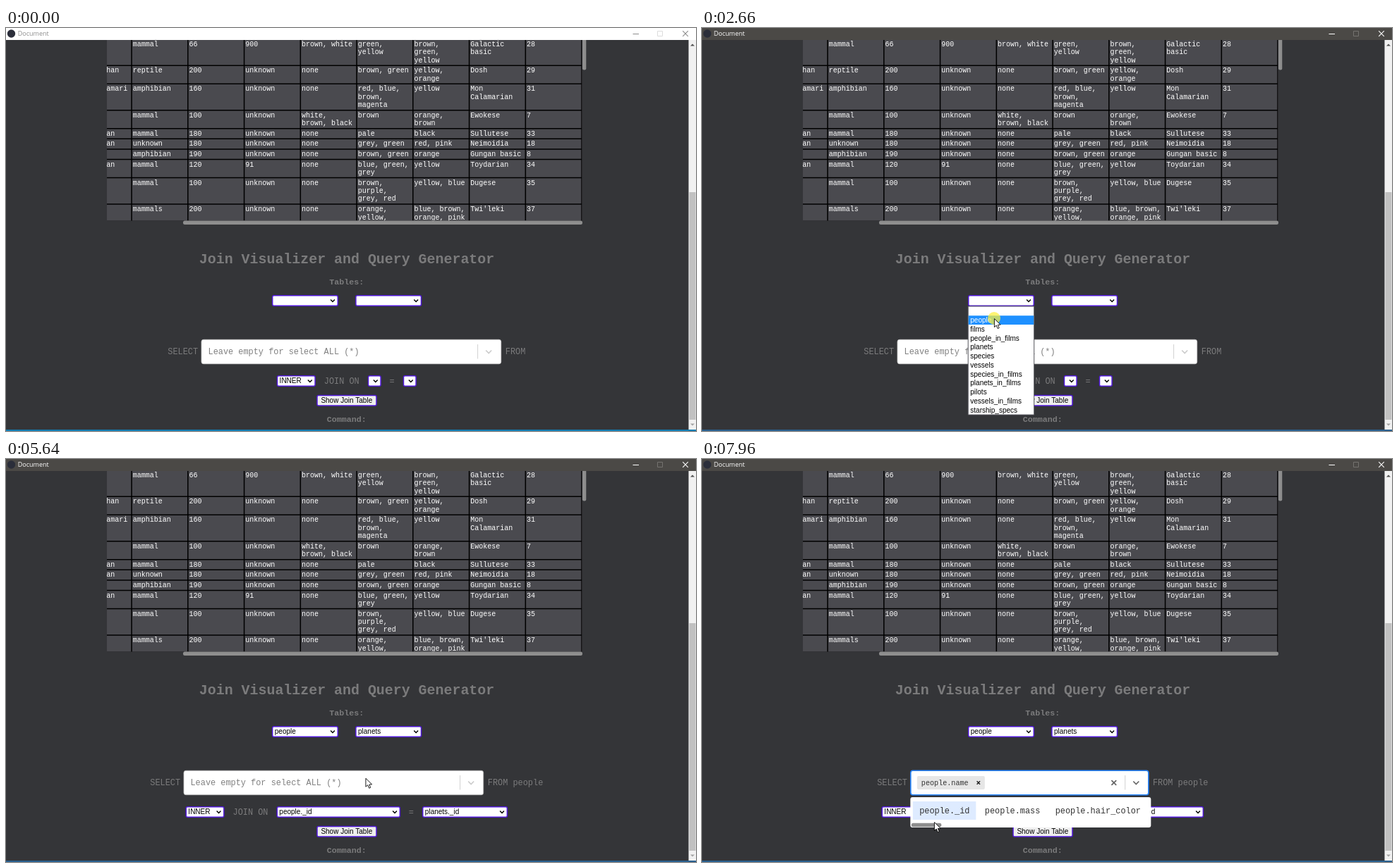
Recreate the animation shown at these times as an HTML page with a canvas. Size 978x572 px, loop 8 s.

```html
<!DOCTYPE html>
<html>
<head>
<meta charset="utf-8">
<title>Document</title>
<style>
html, body { margin: 0; width: 100%; height: 100%; overflow: hidden; background: #343538; }
canvas { display: block; }
</style>
</head>
<body>
<canvas id="stage" width="978" height="572"></canvas>
<script>
const ctx = document.getElementById('stage').getContext('2d');
const LOOP = 8000, MONO = '"Liberation Mono", monospace', SANS = '"Liberation Sans", sans-serif';
const PURPLE = '#5019d8', GREY = '#7b7b7c', BACK = '#343538';
const CHAR = 7.15, CENTER = 482.8;

const TABLES = ['', 'people', 'films', 'people_in_films', 'planets', 'species', 'vessels',
  'species_in_films', 'planets_in_films', 'pilots', 'vessels_in_films', 'starship_specs'];

// Cells are split by "|", lines within a cell by "/".
const ROWS = [
  '|mammal|66|900|brown, white|green,/yellow|brown,/green,/yellow|Galactic/basic|28',
  'han|reptile|200|unknown|none|brown, green|yellow,/orange|Dosh|29',
  'amari|amphibian|160|unknown|none|red, blue,/brown,/magenta|yellow|Mon/Calamarian|31',
  '|mammal|100|unknown|white,/brown, black|brown|orange,/brown|Ewokese|7',
  'an|mammal|180|unknown|none|pale|black|Sullutese|33',
  'an|unknown|180|unknown|none|grey, green|red, pink|Neimoidia|18',
  '|amphibian|190|unknown|none|brown, green|orange|Gungan basic|8',
  'an|mammal|120|91|none|blue, green,/grey|yellow|Toydarian|34',
  '|mammal|100|unknown|none|brown,/purple,/grey, red|yellow, blue|Dugese|35',
  '|mammals|200|unknown|none|orange,/yellow,|blue, brown,/orange, pink|Twi\'leki|37',
].map(row => row.split('|').map(cell => cell.split('/')));

// Pointer path: time, x, y
const PATH = [[120, 901, 551], [740, 421, 395], [880, 421, 395], [1000, 419, 389], [1960, 419, 389],
  [2340, 413, 411], [2490, 413, 411], [2500, 414, 412], [2760, 414, 412], [3420, 550, 391], [3690, 550, 390],
  [4500, 550, 390], [5050, 540, 451], [5350, 540, 451], [6010, 466, 455], [6200, 466, 454],
  [6490, 466, 454], [6880, 322, 478], [7290, 380, 498], [7810, 380, 498], [7950, 329, 515]];
const CLICKS = [[1000, 1130], [2655, 2760], [3690, 3780], [5250, 5350], [6200, 6245], [7350, 7460]];

function pointerAt(t) {
  if (t < PATH[0][0]) return null;
  const next = PATH.findIndex(p => p[0] > t);
  if (next < 0) return PATH[PATH.length - 1].slice(1);
  const [t0, x0, y0] = PATH[next - 1], [t1, x1, y1] = PATH[next];
  const u = (t - t0) / (t1 - t0), k = u * u * (3 - 2 * u);
  return [x0 + (x1 - x0) * k, y0 + (y1 - y0) * k];
}

function rect(x, y, w, h, fill, radius = 0, stroke, width = 1.5) {
  ctx.beginPath();
  ctx.roundRect(x, y, w, h, radius);
  if (fill) { ctx.fillStyle = fill; ctx.fill(); }
  if (stroke) { ctx.strokeStyle = stroke; ctx.lineWidth = width; ctx.stroke(); }
}

function text(str, x, y, color, size, family = MONO, weight = '', align = 'left') {
  ctx.font = `${weight} ${size}px ${family}`;
  ctx.textAlign = align;
  ctx.fillStyle = color;
  ctx.fillText(str, x, y);
}

function lines(color, width, ...paths) {
  ctx.strokeStyle = color;
  ctx.lineWidth = width;
  ctx.beginPath();
  for (const [x, y, ...rest] of paths) {
    ctx.moveTo(x, y);
    for (let i = 0; i < rest.length; i += 2) ctx.lineTo(rest[i], rest[i + 1]);
  }
  ctx.stroke();
}

function polygon(fill, points) {
  ctx.beginPath();
  points.forEach(([x, y]) => ctx.lineTo(x, y));
  ctx.closePath();
  ctx.fillStyle = fill;
  ctx.fill();
}

const chevron = (x, y, r, color, width) =>
  lines(color, width, [x - r, y - r / 2, x, y + r / 2, x + r, y - r / 2]);
const cross = (x, y, r, color, width) =>
  lines(color, width, [x - r, y - r, x + r, y + r], [x + r, y - r, x - r, y + r]);

function clipped(x, y, w, h, draw) {
  ctx.save();
  ctx.beginPath();
  ctx.rect(x, y, w, h);
  ctx.clip();
  draw();
  ctx.restore();
}

function drawTable() {
  clipped(143, 17, 673.5, 256.5, () => {
    rect(143, 17, 673.5, 257, '#000');
    let y = 15.6;
    for (const row of ROWS) {
      const height = 3.15 + 11.45 * Math.max(...row.map(cell => cell.length));
      row.forEach((cell, col) => {
        const x = 98.3 + 79.75 * col;
        rect(x + .8, y + .8, 78.2, height - 1.5, '#4a4a4f');
        cell.forEach((line, i) => text(line, col ? x + 1.8 : 142.3, y + 10 + 11.45 * i, '#fff', 10));
      });
      y += height;
    }
  });
  rect(817, 17, 5.3, 42.5, '#8e8e8e', [0, 0, 2, 2]);
  rect(251, 273.5, 566, 5.6, '#8e8e8e', 2.5);
}

function drawChrome(active) {
  rect(0, 0, 978, 17, active ? '#4b4946' : '#fff');
  const ink = active ? '#fff' : '#8c8c8c';
  ctx.beginPath();
  ctx.arc(7.5, 8, 5.7, 0, 7);
  ctx.fillStyle = '#2b2e3a';
  ctx.fill();
  text('Document', 16.8, 11.3, ink, 9, '"Open Sans", sans-serif');
  lines(ink, 1, [888.5, 8.5, 897, 8.5]);
  rect(923.5, 4.5, 7, 7, null, 0, active ? '#74726f' : '#dcdcdc', 1);
  cross(963, 8, 3.8, ink, 1.1);

  rect(967.5, 17, 10.5, 553, '#f1f1f1');
  rect(968.5, 233, 9, 323, '#c1c1c1');
  polygon('#505050', [[970, 25.5], [976, 25.5], [973, 22.5]]);
  polygon('#a3a3a3', [[970, 561.5], [976, 561.5], [973, 564.5]]);
  rect(0, 570, 978, 2, active ? '#2a608f' : '#127cb2');
}

function select(x, y, w, value) {
  rect(x + .7, y + .7, w - 1.4, 14.6, '#fff', 2, PURPLE);
  text(value, x + 3.8, y + 11.3, '#000', 10, SANS);
  chevron(x + w - 8, y + 8, 2.9, '#000', 1.5);
}

function optionList(x, pointerY) {
  const step = 12.76, picked = Math.max(0, Math.floor((pointerY - 395.5) / step));
  rect(x + .5, 395, 93.5, 154, '#fff', 0, '#55555c', 1);
  TABLES.forEach((name, i) => {
    const y = 395.5 + step * i;
    if (i === picked) rect(x + 1, y, 92.5, step, '#1e90ff');
    text(name, x + 3.6, y + 9.8, i === picked ? '#fff' : '#000', 10, SANS);
  });
}

function drawJoinRow(first, second) {
  const firstWidth = second ? 175.5 : first ? 117 : 19;
  const secondWidth = second ? 121 : 19;
  let x = CENTER - (160 + firstWidth + secondWidth) / 2;
  select(x, 493, 55, 'INNER');
  text('JOIN ON', x + 67, 504.7, GREY, 11.9);
  x += 129;
  select(x, 493, firstWidth, first && first + '._id');
  x += firstWidth;
  text('=', x + 11.7, 504.7, GREY, 11.9);
  select(x + 31, 493, secondWidth, second && second + '._id');
  rect(441, 521.5, 84, 14.6, '#efefef', 2, PURPLE);
  text('Show Join Table', CENTER, 532.3, '#000', 10, SANS, '', 'center');
}

function drawMenu(x, w, fields, pointer) {
  rect(x, 480, w, 43, '#fff', 3);
  clipped(x, 480, w - 1, 43, () => {
    let left = x + 3.5;
    const spots = fields.map(name => {
      const spot = { name, left, width: name.length * CHAR + 18 };
      left += spot.width + 3.2;
      return spot;
    });
    const over = s => pointer[1] > 486 && pointer[1] < 512 && pointer[0] > s.left && pointer[0] < s.left + s.width;
    const focused = spots.find(over) || spots[0];
    rect(focused.left, 486, focused.width, 26, '#deebff');
    for (const s of spots) text(s.name, s.left + 9.3, 502.6, '#333', 11.9);
  });
}

function drawFieldPicker(t, table, focused, picked, pointer) {
  const from = table ? 'FROM ' + table : 'FROM';
  const w = picked ? 338 : 425.7;
  const start = CENTER - (52.7 + w + from.length * CHAR) / 2;
  const x = start + 47.2, right = x + w;
  const hovered = pointer && pointer[0] > x && pointer[0] < right && pointer[1] > 442 && pointer[1] < 477;
  text('SELECT', start, 463, GREY, 11.9);
  text(from, right + 5.6, 463, GREY, 11.9);
  rect(x + .5, 442.3, w - 1, 34.4, '#fff', 3, focused ? '#2684ff' : hovered ? '#b3b3b3' : '#ccc', focused ? 1.6 : .8);
  if (picked) {
    rect(x + 9.5, 450, 96, 19, '#e6e6e6', 2);
    text('people.name', x + 15.5, 463, '#333', 10.15);
    cross(x + 96.5, 459.5, 2.2, '#222', 1.5);
    cross(right - 49.5, 459.5, 3.4, '#666', 1.7);
  } else {
    text('Leave empty for select ALL (*)', x + 10, 463, '#808080', 11.9);
  }
  rect(right - 34, 449, .9, 20.5, '#ccc');
  chevron(right - 18, 459.5, 4, focused ? '#666' : '#ccc', 1.7);
  if (!focused) return;

  const blinkFrom = picked ? 7420 : 6230;
  if ((t - blinkFrom) % 1000 < 500) rect(picked ? x + 109 : x + 228, 452, 1, 14.5, '#222');
  const fields = ['_id', 'name', 'mass', 'hair_color'].filter(f => !picked || f !== 'name');
  drawMenu(x, w + 3, fields.map(f => 'people.' + f), pointer);
  rect(x + 1.5, 516.8, picked ? 42.5 : 64.5, 5.4, '#8e8e8e', 2.5);
}

function drawPointer([x, y], clicking) {
  if (clicking) {
    ctx.beginPath();
    ctx.arc(x, y, 9, 0, 7);
    ctx.fillStyle = 'rgba(255, 240, 60, .72)';
    ctx.fill();
  }
  ctx.save();
  ctx.translate(x + .4, y + .6);
  polygon('#fff', [[0, 0], [0, 12], [2.8, 9.5], [4.8, 14], [6.8, 13.1], [4.9, 8.8], [8.7, 8.6]]);
  ctx.strokeStyle = '#000';
  ctx.lineWidth = .9;
  ctx.stroke();
  ctx.restore();
}

function draw(t) {
  const during = (from, to) => t >= from && t < to;
  const pointer = pointerAt(t);
  const first = t >= 2740 ? 'people' : '', second = t >= 5330 ? 'planets' : '';

  rect(0, 0, 978, 572, BACK);
  drawTable();
  drawChrome(t >= 1090);
  text('Join Visualizer and Query Generator', CENTER + .2, 334, GREY, 19.93, MONO, 'bold', 'center');
  text('Tables:', CENTER, 363.5, GREY, 11.65, MONO, 'bold', 'center');
  text('Command:', CENTER, 558.5, GREY, 11.65, MONO, 'bold', 'center');
  select(377, 379, 94, first);
  select(495.2, 379, 94, second);
  drawJoinRow(first, second);
  drawFieldPicker(t, first, t >= 6230, t >= 7420, pointer);
  if (during(1150, 2740)) optionList(376.7, pointer[1]);
  if (during(3780, 5330)) optionList(495, pointer[1]);
  if (pointer) drawPointer(pointer, CLICKS.some(([from, to]) => during(from, to)));
}

function tick() {
  draw(performance.now() % LOOP);
  requestAnimationFrame(tick);
}
tick();
</script>
</body>
</html>
```
